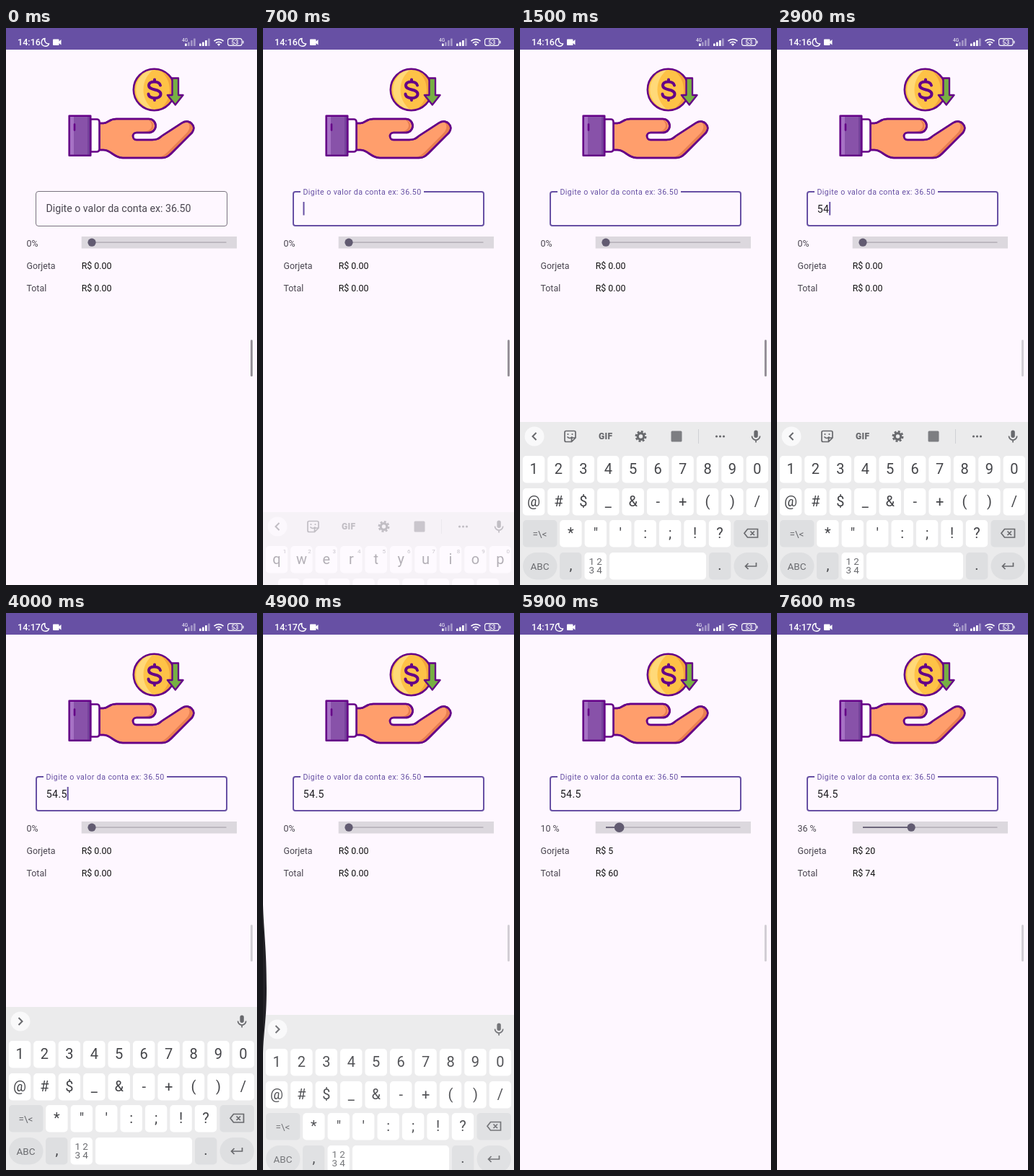
These frames come from a looping animation (348x772 px, 8 s). An HTML page:

```html
<!DOCTYPE html>
<html lang="pt-BR">
<head>
<meta charset="utf-8">
<title>Calculadora de gorjeta</title>
<style>
  html, body { margin: 0; width: 100%; height: 100%; overflow: hidden; background: #fef7ff; }
  svg { display: block; width: 100vw; height: 100vh; font-family: Roboto, sans-serif; }
  .anim { animation: 8s step-end infinite; }
  .body { font-size: 12.4px; fill: #49454f; }
  .value { fill: #111; }
  .ink { fill: none; stroke: #650087; stroke-width: 2.6; stroke-linejoin: round; stroke-linecap: round; }
  .key { font-size: 20px; fill: #444549; text-anchor: middle; }
  .small { font-size: 13.5px; fill: #6b6c70; }
  .hint { font-size: 8px; fill: #77787c; text-anchor: middle; }
  .line { fill: none; stroke: #68696d; stroke-width: 1.7; }

  #label { animation-name: label; }
  @keyframes label {
    0% { font-size: 14.17px; letter-spacing: 0; fill: #49454f; transform: translate(55.5px, 255.3px); }
    6.25% { font-size: 12.4px; letter-spacing: .2px; fill: #6750a4; transform: translate(55.5px, 243px); }
    7.5%, 100% { font-size: 10.63px; letter-spacing: .4px; fill: #6750a4; transform: translate(55.5px, 231.3px); }
  }
  #idle { animation-name: idle; }
  @keyframes idle { 0% { opacity: 1; } 6.25%, 100% { opacity: 0; } }
  #focus { animation-name: focus; }
  @keyframes focus { 0% { opacity: 0; } 6.25%, 100% { opacity: 1; } }

  #caret { animation-name: caret; }
  @keyframes caret {
    0%, 15%, 32.5%, 46.25%, 56.25%, 70%, 81.25%, 95%, 100% { opacity: 0; }
    7.5%, 21.25%, 35%, 50%, 63.75%, 76.25%, 87.5% { opacity: 1; }
  }

  #keyboard { animation-name: slide; }
  @keyframes slide {
    0%, 63.75%, 100% { transform: translateY(230px); opacity: 0; }
    7.5% { transform: translateY(190px); opacity: .15; }
    8.75% { transform: translateY(125px); opacity: .4; }
    10% { transform: translateY(62px); opacity: .7; }
    11.25% { transform: translateY(24px); opacity: .9; }
    12.5% { transform: translateY(6px); opacity: 1; }
    13.75%, 60% { transform: none; opacity: 1; }
    61.25% { transform: translateY(11px); opacity: .92; }
    62.5% { transform: translateY(110px); opacity: .5; }
  }
  #letters { animation-name: letters; }
  @keyframes letters { 0% { opacity: 1; } 18.75%, 100% { opacity: 0; } }
  #numbers { animation-name: numbers; }
  @keyframes numbers { 0% { opacity: 0; } 18.75%, 100% { opacity: 1; } }
  #tools { animation-name: tools; }
  @keyframes tools { 0% { opacity: 1; } 37.5% { opacity: .45; } 38.75%, 100% { opacity: 0; } }
  #chevron { animation-name: flip; transform-origin: 20px 566px; }
  @keyframes flip { 0% { transform: none; } 37.5%, 100% { transform: scaleX(-1); } }

  #handle { animation-name: dim; }
  @keyframes dim { 0% { fill: #969199; } 20% { fill: #aaa5ad; } 21.25% { fill: #bfbac2; } 22.5%, 100% { fill: #d2ced5; } }
  #swell { animation-name: swell; }
  @keyframes swell { 0%, 62.5%, 100% { transform: scaleX(0); } 60% { transform: scaleX(2.6); } 61.25% { transform: none; } }
</style>
</head>
<body>
<svg viewBox="0 0 348 772" preserveAspectRatio="none">
  <rect width="348" height="772" fill="#fef7ff"/>

  <!-- Status bar -->
  <rect width="348" height="30" fill="#6750a4"/>
  <g fill="#fff">
    <text id="clock" x="16" y="24.3" font-size="12.6" font-weight="500"></text>
    <path d="M54 14.5a5.4 5.4 0 1 0 5.7 7.3a5.3 5.3 0 0 1-5.7-7.3z" fill="none" stroke="#fff" stroke-width="1.4" stroke-linejoin="round"/>
    <path d="M66 15.5h6.5a1 1 0 0 1 1 1v2l3-2.6v7.600l-3-2.600v2.100a1 1 0 0 1-1 1h-6.500a1 1 0 0 1-1-1v-6.500a1 1 0 0 1 1-1z"/>
    <text x="244" y="18.500" font-size="6.500">4G</text>
    <g id="signal"></g>
    <g fill="none" stroke="#fff" stroke-width="1.700">
      <path d="M288.500 18.200a9.300 9.300 0 0 1 13 0M291 20.900a5.700 5.700 0 0 1 8 0"/>
      <rect x="307.600" y="14.600" width="19.500" height="9.800" rx="3" stroke-width="1.100"/>
    </g>
    <path d="M292.800 22.600a3.200 3.200 0 0 1 4.400 0l-2.200 2.400z"/>
    <rect x="328.200" y="17.500" width="1.300" height="4" rx=".6"/>
    <text x="317.400" y="22.600" font-size="8.500" font-weight="500" text-anchor="middle">53</text>
  </g>

  <!-- Hand and coin -->
  <circle cx="205.500" cy="85.500" r="28.700" fill="#fec247"/>
  <path d="M205.500 57a28.700 28.700 0 0 0 0 57a34 34 0 0 1-15-28.500a34 34 0 0 1 15-28.500z" fill="#ffd978"/>
  <path d="M212 57.600a28.700 28.700 0 0 1 0 55.800a34 34 0 0 0 15-27.900a34 34 0 0 0-15-27.900z" fill="#f3a53b"/>
  <circle class="ink" cx="205.500" cy="85.500" r="28.700"/>
  <path class="ink" style="stroke-width:4" d="M214 79.500C213 73 198 72.500 198 79.500C198 87.500 214.500 83.500 214.500 91.500C214.500 99 198 99 197.500 91.500M206 71.500v3M206 97v3"/>
  <path d="M230.500 69.500h8.500v23.500h6.500l-10.700 13.500l-11-13.500h6.700z" fill="#76b043"/>
  <path class="ink" style="stroke-width:2.300" d="M230.500 69.500h8.500v23.500h6.500l-10.700 13.500l-11-13.500h6.700z"/>
  <path id="palm" d="M129 132H135C141 132 143 126 153 126H198A9.500 9.500 0 0 1 198 145H181A5 5 0 0 0 181 155H203C211 155 213 152 217 149L244 131.500C254 125 265 136 258 145L229 174C224 179 221 180 216 180H162C149 180 146 169 135 169H129z" fill="#ff9e6c"/>
  <path d="M198 127.500a8.500 8.500 0 0 1 0 16.500h-8c13-1 15-10 8-16.500zM250 130C262 128 262 140 256 146L228 173C224 177 221 179 213 179C219 177 222 174 226 170L249 147C256 140 256 133 250 130z" fill="#e87f50"/>
  <use href="#palm" class="ink" style="fill-opacity:0"/>
  <path class="ink" d="M129 132H135C141 132 143 126 153 126H198A9.500 9.500 0 0 1 198 145H181A5 5 0 0 0 181 155H203C211 155 213 152 217 149L244 131.500C254 125 265 136 258 145L229 174C224 179 221 180 216 180H162C149 180 146 169 135 169H129z"/>
  <path class="ink" style="fill:#fff" d="M117 126.500h9a3.500 3.500 0 0 1 3.500 3.500v38a3.500 3.500 0 0 1-3.500 3.500h-9z"/>
  <rect x="87.700" y="121.700" width="29.500" height="55" fill="#8852a9"/>
  <path d="M89 123h5v53h-5z" fill="#a672c4"/>
  <path d="M113 123h4v53h-4z" fill="#74429a"/>
  <rect class="ink" x="87.700" y="121.700" width="29.500" height="55"/>
  <path class="ink" d="M95 133.500v8"/>

  <!-- Amount field -->
  <rect id="idle" class="anim" x="41.500" y="226.500" width="265" height="48" rx="3.500" fill="none" stroke="#79747e"/>
  <path id="focus" class="anim" d="M52 227H45a3 3 0 0 0-3 3V271a3 3 0 0 0 3 3H303a3 3 0 0 0 3-3V230a3 3 0 0 0-3-3H223" fill="none" stroke="#6750a4" stroke-width="2"/>
  <text id="label" class="anim">Digite o valor da conta ex: 36.50</text>
  <text id="amount" x="55.700" y="256.200" font-size="14.170" letter-spacing=".4" fill="#1c1b1f"></text>
  <rect id="caret" class="anim" y="241" width="2" height="18.500" fill="#6750a4"/>

  <!-- Tip rows -->
  <text id="percent" class="body" x="28.500" y="302.500"></text>
  <text class="body" x="28.500" y="334">Gorjeta</text>
  <text class="body" x="28.500" y="365.200">Total</text>
  <text id="tip" class="body value" x="104.700" y="334"></text>
  <text id="total" class="body value" x="104.700" y="365.200"></text>
  <rect x="104.700" y="289" width="215.300" height="16.500" fill="#dcd8de"/>
  <path d="M119 297.200H305.500" stroke="#b8b3bb" stroke-width="1.800"/>
  <path id="track" stroke="#625b71" stroke-width="1.800"/>
  <circle id="thumb" cy="297.200" fill="#625b71"/>

  <rect id="handle" class="anim" x="339" y="432" width="3" height="51" rx="1.500"/>

  <g id="keyboard" class="anim">
    <rect y="546" width="348" height="240" fill="#ebebec"/>
    <circle cx="20" cy="566" r="13.500" fill="#f9f9fa"/>
    <path id="chevron" class="anim line" d="M22.500 561l-5 5l5 5" style="stroke-width:2"/>
    <g id="tools" class="anim">
      <g class="line">
        <path d="M64 558.500h11a2 2 0 0 1 2 2v7.500l-5.500 5.500h-7.500a2 2 0 0 1-2-2v-11a2 2 0 0 1 2-2zM77 568h-3.500a2 2 0 0 0-2 2v3.500M65.500 566.500q3.500 4 7 0"/>
        <circle cx="167.500" cy="566" r="4.300" stroke-width="3.200"/>
        <circle cx="167.500" cy="566" r="6.800" style="stroke-width:2.400;stroke-dasharray:3 2.340"/>
      </g>
      <g fill="#68696d">
        <circle cx="66.500" cy="563" r="1.100"/><circle cx="72.500" cy="563" r="1.100"/>
        <text x="118.700" y="570.200" font-size="12" font-weight="800" letter-spacing=".4" text-anchor="middle">GIF</text>
        <rect x="209.500" y="558.500" width="15" height="15" rx="1.500" fill="#7d7e82"/>
        <circle cx="272.500" cy="566" r="1.600"/><circle cx="277.500" cy="566" r="1.600"/><circle cx="282.500" cy="566" r="1.600"/>
      </g>
      <path d="M247.500 556v20" stroke="#d0d1d4"/>
    </g>
    <rect x="324.400" y="557.500" width="5.400" height="10.500" rx="2.700" fill="#68696d"/>
    <path class="line" d="M321.500 565.500a5.600 5.600 0 0 0 11.200 0M327.100 571v3.500"/>
    <g id="letters" class="anim"></g>
    <g id="numbers" class="anim"></g>
  </g>
  <path id="swell" class="anim" d="M0 404C1 440 5 465 5 520C5 570 0 580 0 620z" fill="#222126"/>
</svg>

<script>
const $ = id => document.getElementById(id);
const LOOP = 8000, STEP = 100, PITCH = 34.43, GRAY = '#dedfe1';

const box = (x, y, w, fill = '#fff', rx = 5) =>
  `<rect x="${x}" y="${y}" width="${w}" height="37.500" rx="${rx}" fill="${fill}"/>`;
const glyph = (s, x, y, cls = '') => {
  const safe = s.replace('&', '&amp;').replace('<', '&lt;');
  return `<text class="key ${cls}" x="${x}" y="${y}">${safe}</text>`;
};

// A run of equal keys whose first centre is at cx
function row(chars, cx, y, hints = '') {
  return [...chars].map((c, i) => {
    const x = cx + i * PITCH;
    const hint = hints ? `<text class="hint" x="${x + 11}" y="${y + 10}">${hints[i]}</text>` : '';
    return box(x - 15.2, y, 30.4) + glyph(c, x, y + 25.3) + hint;
  }).join('');
}

// Keys shared by both layouts: side keys, comma, space, period, enter
function frame(left, mode, middle) {
  return box(4, 682, 47.5, GRAY) + left + box(296.5, 682, 47.5, GRAY) +
    `<path class="line" d="M315.500 694.500h14v11.500h-14l-4.500-5.750zM319.500 697.500l5.500 5.500m0-5.500l-5.500 5.500"/>` +
    box(4, 727, 47.5, GRAY, 18.7) + glyph(mode, 27.5, 750.5, 'small') +
    box(55, 727, 30.4, GRAY) + glyph(',', 70.5, 751) +
    box(89.5, 727, 30.4) + middle + box(124, 727, 134) +
    `<g id="dot-${mode}">${box(262, 727, 30.4, GRAY)}</g>` + glyph('.', 277, 751) +
    box(296.5, 727, 47.5, GRAY, 18.7) +
    `<path class="line" d="M327.500 741v5h-15m4-4l-4 4l4 4"/>`;
}

$('letters').innerHTML = row('qwertyuiop', 19, 593, '1234567890') + row('asdfghjkl', 36.2, 638) +
  row('zxcvbnm', 70.4, 682) + frame(
    '<path class="line" d="M27.500 693l-7 7.500h4v6h6v-6h4z"/>', '?123',
    '<g class="line"><circle cx="104.700" cy="746" r="7"/><path d="M101 747.500q3.700 4 7.400 0M102 743.500h1m3.400 0h1"/></g>');

$('numbers').innerHTML = row('1234567890', 19, 593) + row('@#$_&-+()/', 19, 638) +
  row('*"\':;!?', 70.4, 682) + frame(
    glyph('=\\<', 27.5, 705.5, 'small'), 'ABC',
    ['1 2', '3 4'].map((s, i) => glyph(s, 104.7, 744 + i * 11.5, 'small')).join(''));

$('signal').innerHTML = [[248, 1], [268, 3]].map(([x, lit]) =>
  [3.5, 5.5, 8, 10.5].map((h, i) =>
    `<rect x="${x + i * 4}" y="${25 - h}" width="2.700" height="${h}" rx=".6" opacity="${i < lit ? 1 : .4}"/>`
  ).join('')).join('');

const typed = [[0, ''], [2100, '5'], [2800, '54'], [3200, '54.'], [4000, '54.5']];
const dragged = [[0, 0], [5800, 3], [5900, 10], [6000, 19], [6100, 28], [6200, 34], [6300, 36]];
const at = (steps, t) => steps.filter(s => s[0] <= t).pop()[1];
const period = $('dot-ABC').firstElementChild;

function draw(t) {
  const text = at(typed, t), pct = at(dragged, t);
  const bill = Number(text) || 0, tip = bill * pct / 100;
  const money = n => 'R$ ' + (pct ? Math.round(n) : '0.00');
  $('clock').textContent = t < 3700 ? '14:16' : '14:17';
  $('amount').textContent = text;
  $('caret').setAttribute('x', 55.5 + (text ? $('amount').getComputedTextLength() : 0));
  $('percent').textContent = pct ? pct + ' %' : '0%';
  $('tip').textContent = money(tip);
  $('total').textContent = money(bill + tip);
  const x = 119 + 1.865 * pct;
  $('track').setAttribute('d', `M119 297.200H${x}`);
  $('thumb').setAttribute('cx', x);
  $('thumb').setAttribute('r', t >= 5800 && t < 6300 ? 6.8 : 5.6);
  period.setAttribute('fill', t === 3200 ? '#c9cacd' : GRAY);
}

let start, shown;
function tick(now) {
  start ??= now;
  const t = Math.floor((now - start) % LOOP / STEP) * STEP;
  if (t !== shown) draw(shown = t);
  requestAnimationFrame(tick);
}
draw(0);
requestAnimationFrame(tick);
</script>
</body>
</html>
```
